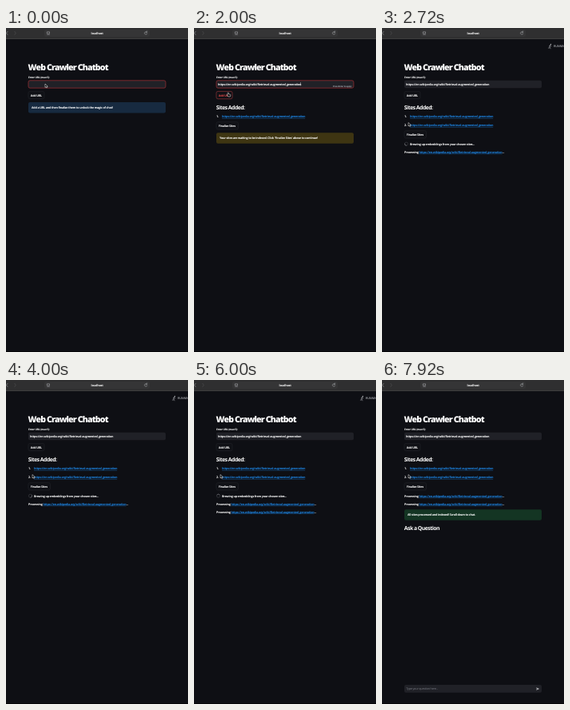
These frames come from a looping animation (228x406 px, 8000 ms). An HTML page:

```html
<!DOCTYPE html>
<html lang="en">
<head>
<meta charset="utf-8">
<title>Web Crawler Chatbot</title>
<style>
html, body { margin: 0; width: 100%; height: 100%; overflow: hidden; background: #0e0f14; }
svg { display: block; width: 100vw; height: 100vh; }
text { font: 700 3.75px "Open Sans", "Noto Sans", sans-serif; fill: #fff; letter-spacing: -.06em; white-space: pre; text-rendering: geometricPrecision; }
.h1 { font-size: 10.6px; font-weight: 800; letter-spacing: -.08em; }
.h3 { font-size: 6.8px; letter-spacing: -.07em; }
.label { font-size: 3.3px; }
.hint { font-size: 2.7px; fill: #a3a5ab; }
.dim { fill: #777a82; font-weight: 400; }
.status { fill: #a5a7ac; font-weight: 600; }
.link { fill: #1c83e1; text-decoration: underline; }
.red { fill: #e04646; }
.btn { fill: #101116; stroke: #2d2e33; stroke-width: .4; }
.btn.on { stroke: #e04646; }
.line { fill: none; stroke: #b5b6ba; stroke-width: .5; stroke-linecap: round; stroke-linejoin: round; }
</style>
</head>
<body>
<svg id="stage" viewBox="0 0 228 406" preserveAspectRatio="none"></svg>
<script>
const LOOP = 8000;
const URL_TEXT = 'https://en.wikipedia.org/wiki/Retrieval-augmented_generation';
const T = { paste1: 160, add1: 560, paste2: 1760, add2: 2080, run: 2400, second: 5680, done: 7200 };

const text = (x, y, s, cls = '') => `<text x="${x}" y="${y}" class="${cls}">${s}</text>`;
const rect = (x, y, w, h, fill, r = 2, more = '') =>
  `<rect x="${x}" y="${y}" width="${w}" height="${h}" rx="${r}" fill="${fill}" ${more}/>`;
const path = (d, more = '') => `<path class="line" d="${d}" ${more}/>`;
const span = (from, to, body) => `<g data-from="${from}" data-to="${to}">${body}</g>`;
const button = (y, w, s, on = false) =>
  `<rect class="btn${on ? ' on' : ''}" x="28" y="${y}" width="${w}" height="9.4" rx="2"/>` +
  text(30.8, y + 6.1, s, on ? 'red' : '');
const alertBox = (y, fill, s) => rect(28, y, 172, 13.6, fill) + text(32, y + 8.1, s);
const item = (n, y) => text(28, y, n + '.') + text(35, y, URL_TEXT, 'link');
const processing = y => text(28, y, `Processing <tspan class="link">${URL_TEXT}</tspan>...`);
const focusRing = rect(28, 65.8, 172, 9.4, 'none', 2, 'stroke="#b93338" stroke-width=".6"');
const typed = text(30, 71.8, URL_TEXT);
const applyHint = text(174, 73.7, 'Press Enter to apply', 'hint');
const waiting = "Your sites are waiting to be indexed. Click 'Finalize Sites' above to continue!";

const browserBar =
  rect(0, 0, 228, 14, '#2f2f30', 0) + rect(0, 13, 228, 1, '#3d3d3e', 0) +
  rect(48, 2, 132, 9, '#353536', 2) +
  path('M2 4.4L.5 6.4L2 8.4') + path('M10.8 4.4L12.3 6.4L10.8 8.4', 'opacity=".3"') +
  path('M51.7 4.8h2.8v2.2h-2.8zM51.7 8.2h2.8', 'stroke-width=".4"') +
  path('M176.4 5.2A1.7 1.7 0 1 0 176.8 7M176.6 3.9v1.5h-1.5', 'stroke-width=".4"') +
  text(106.5, 7.9, 'localhost');

const runner = span(T.run, T.done,
  `<g id="runA">${path('M210.8 21.3L210 23.2L211.6 24.2V25.8M210 23.2L208.6 24.7M208.8 21.9L210.8 21.3L212.6 22.6')}</g>` +
  `<g id="runB">${path('M210.8 21.3L210.2 23.3L211 25.8M210.2 23.3L209.4 25.3L208.4 25M209.4 22.6L210.8 21.3L212 22.9')}</g>` +
  '<circle cx="211.5" cy="20.4" r=".7" fill="#b5b6ba"/>' +
  text(215, 23.9, 'RUNNING...', 'status'));

const spinner = span(T.run, T.done,
  '<circle cx="30.5" cy="145.2" r="2.1" fill="none" stroke="#4a4c52" stroke-width=".5"/>' +
  `<g id="spin">${path('M28.9 143.8A2.1 2.1 0 0 1 32.1 143.8', 'opacity=".7"')}</g>` +
  text(35, 146.5, 'Brewing up embeddings from your chosen sites...'));

document.getElementById('stage').innerHTML =
  rect(0, 0, 228, 406, '#0e0f14', 0) + rect(0, 405, 228, 1, '#050507', 0) + browserBar + runner +
  text(27.5, 52.6, 'Web Crawler Chatbot', 'h1') +
  text(28, 62.8, 'Enter URL (max 5):', 'label') +
  rect(28, 65.8, 172, 9.4, '#202127') +
  span(0, T.add1, focusRing) + span(T.paste1, T.add1, typed + applyHint) +
  span(T.paste2 - 80, T.add2, focusRing) +
  span(T.paste2, T.add2, applyHint + rect(133.5, 68, .4, 4.4, '#fafafa', 0)) + span(T.paste2, LOOP, typed) +
  button(79.4, 20, 'Add URL') +
  span(400, T.add1, button(79.4, 20, 'Add URL', true)) +
  span(1920, T.add2 + 80, button(79.4, 20, 'Add URL', true)) +
  span(0, T.add1, alertBox(93, '#172a40', 'Add a URL and then finalize them to unlock the magic of chat!')) +
  span(T.add1, LOOP, text(27.8, 101.5, 'Sites Added:', 'h3') + item(1, 111.9)) +
  span(T.add1, T.add2, button(117.7, 27.5, 'Finalize Sites') + alertBox(131.2, '#3e3512', waiting)) +
  span(T.add2, LOOP, item(2, 122.9) + button(128.7, 27.5, 'Finalize Sites')) +
  span(T.add2, T.run, alertBox(142.2, '#3e3512', waiting)) +
  span(2240, T.run, button(128.7, 27.5, 'Finalize Sites', true)) +
  spinner +
  span(T.run, T.done, processing(156.7)) + span(T.second, T.done, processing(166.5)) +
  span(T.done, LOOP,
    processing(146.7) + processing(156.7) +
    alertBox(162.2, '#143523', 'All sites processed and indexed! Scroll down to chat.') +
    text(27.8, 187.7, 'Ask a Question', 'h3') +
    rect(28, 382, 172, 9.8, '#202127') + text(30.3, 388.2, 'Type your question here...', 'dim') +
    '<path d="M193.2 385.2L197.2 387L193.2 388.8L193.7 387.3L195.3 387L193.7 386.7Z" fill="#b5b6ba"/>') +
  '<g id="mouse" stroke="#fff" stroke-width=".5">' +
  '<path id="arrow" fill="#000" d="M0 0V4.5L1.1 3.5L1.8 5L2.6 4.6L1.9 3.2H3.3Z"/>' +
  '<path id="hand" fill="#111" d="M.7 0Q1.5 0 1.5 .7V1.9L3.4 2.3Q4 2.5 3.8 3.4L3.3 5H.9L-.5 3.1Q-.5 2.5 .1 2.7V.6Q.1 0 .7 0Z"/></g>';

// time, x, y, shape
const moves = [
  [0, 49, 70, 'arrow'], [240, 49, 70, 'arrow'], [400, 42, 81, 'hand'], [640, 42, 81, ''],
  [1680, 49, 71, 'arrow'], [1760, 49, 71, 'arrow'], [1920, 42, 81, 'hand'], [2080, 42, 81, 'hand'],
  [2240, 41, 132, 'hand'], [2400, 41, 132, 'arrow'], [2560, 33, 118.5, 'arrow'], [LOOP, 33, 118.5, 'arrow']
];
const $ = id => document.getElementById(id);
const spans = [...document.querySelectorAll('[data-from]')].map(el => [el, +el.dataset.from, +el.dataset.to]);
const show = (el, on) => { el.style.display = on ? '' : 'none'; };

function draw(t) {
  for (const [el, from, to] of spans) show(el, t >= from && t < to);
  const i = moves.findIndex((m, k) => t >= m[0] && t < moves[k + 1][0]);
  const [a, b] = [moves[i], moves[i + 1]];
  const p = (t - a[0]) / (b[0] - a[0]), e = p * p * (3 - 2 * p);
  $('mouse').setAttribute('transform', `translate(${a[1] + (b[1] - a[1]) * e} ${a[2] + (b[2] - a[2]) * e})`);
  for (const id of ['arrow', 'hand']) show($(id), a[3] === id);
  $('spin').setAttribute('transform', `rotate(${t / 750 * 360} 30.5 145.2)`);
  const step = Math.floor(t / 160) % 2;
  show($('runA'), step === 0);
  show($('runB'), step === 1);
}

const start = performance.now();
function tick() {
  draw((performance.now() - start) % LOOP);
  requestAnimationFrame(tick);
}
tick();
</script>
</body>
</html>
```
